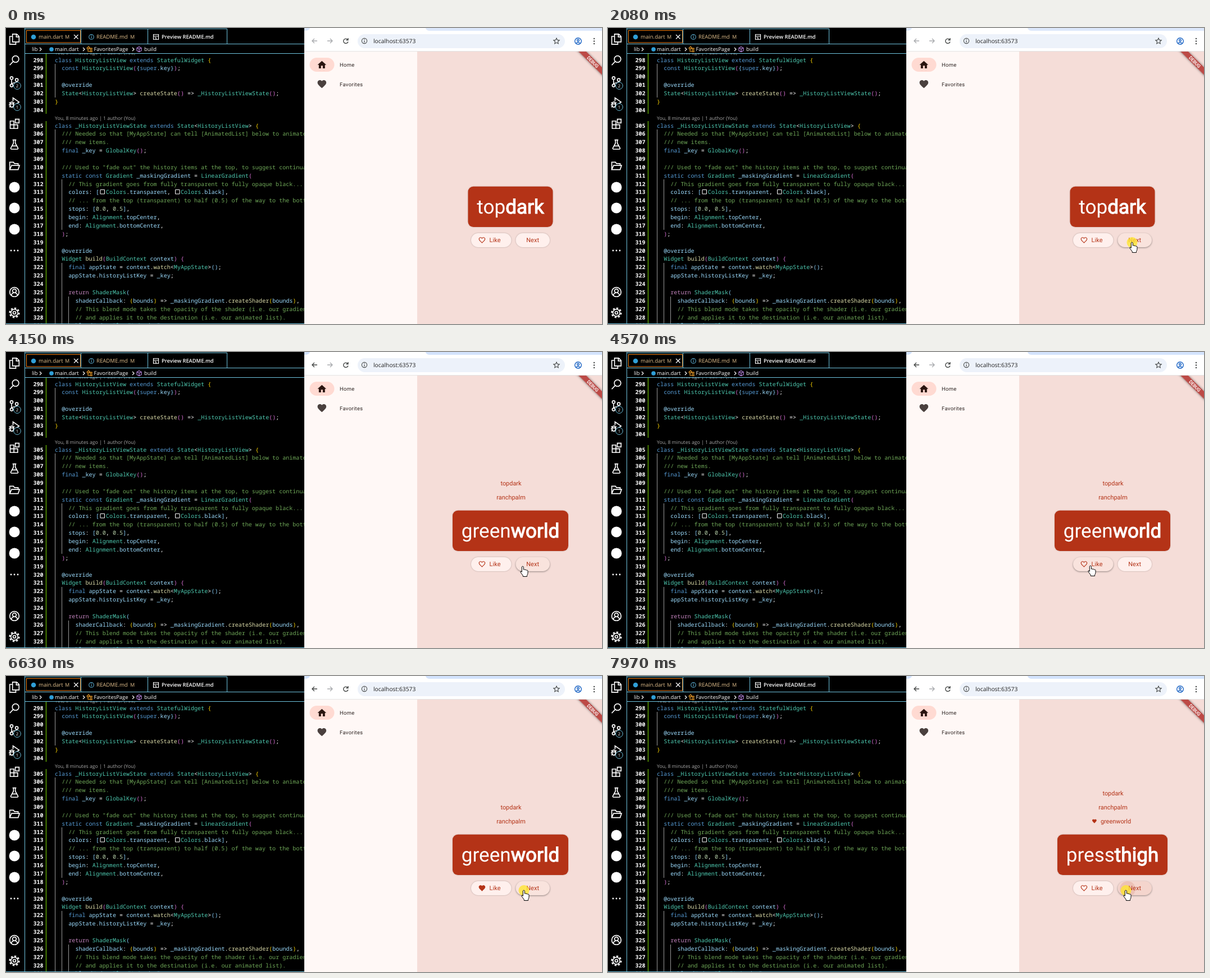
Recreate the animation shown at these times as an HTML page. Size 1061x528 px, loop 8000 ms.

```html
<!DOCTYPE html>
<html lang="en">
<head>
<meta charset="utf-8">
<title>Word pairs</title>
<style>
  html, body { margin: 0; width: 100%; height: 100%; overflow: hidden; background: #000; }
  #stage { display: block; width: 1061px; height: 528px; text-rendering: geometricPrecision; }
  text { white-space: pre; }
  .ui { font-family: "Open Sans", "Noto Sans", sans-serif; }
  .code { font: 500 10.08px "Noto Sans Mono", "DejaVu Sans Mono", monospace; fill: #fff; }
  .app { font-family: Roboto, sans-serif; }
  .label { font-size: 10.92px; fill: #b43317; }
  .line { fill: none; stroke: #fff; stroke-width: 2; }
  .mid { text-anchor: middle; }
  .btn { filter: drop-shadow(0 .8px .8px #0004); }
  .btn.hover { filter: drop-shadow(0 1.5px 1.4px #0006); }
</style>
</head>
<body>
<svg id="stage" viewBox="0 0 1061 528">
  <defs>
    <path id="heart" d="M12 21.35l-1.45-1.32C5.4 15.36 2 12.28 2 8.5 2 5.42 4.42 3 7.5 3c1.74 0 3.41.81 4.5 2.09C13.09 3.81 14.76 3 16.5 3 19.58 3 22 5.42 22 8.5c0 3.78-3.4 6.86-8.55 11.54z"/>
    <path id="hollow" d="M16.5 3c-1.74 0-3.41.81-4.5 2.09C10.91 3.81 9.24 3 7.5 3 4.42 3 2 5.42 2 8.5c0 3.78 3.4 6.86 8.55 11.54L12 21.35l1.45-1.32C18.6 15.36 22 12.28 22 8.5 22 5.42 19.58 3 16.5 3zm-4.4 15.55l-.1.1-.1-.1C7.14 14.24 4 11.39 4 8.5 4 6.5 5.5 5 7.5 5c1.54 0 3.04.99 3.57 2.36h1.87C13.46 5.99 14.96 5 16.5 5c2 0 3.5 1.5 3.5 3.5 0 2.89-3.14 5.74-7.9 10.05z"/>
    <clipPath id="editor"><rect x="34" y="46" width="497" height="482"/></clipPath>
    <clipPath id="page"><rect x="732" y="42" width="329" height="486"/></clipPath>
    <clipPath id="clip-like"><rect x="828" y="366" width="71.5" height="25" rx="12.5"/></clipPath>
    <clipPath id="clip-next"><rect x="907.5" y="366" width="60.5" height="25" rx="12.5"/></clipPath>
  </defs>

  <rect width="1061" height="528"/>

  <!-- activity bar -->
  <g class="line" id="bar"></g>
  <g fill="#fff">
    <circle cx="15" cy="284" r="9.5"/><circle cx="15" cy="321" r="9.5"/><circle cx="15" cy="359" r="9.5"/>
    <circle cx="9" cy="397" r="1.4"/><circle cx="15" cy="397" r="1.4"/><circle cx="21" cy="397" r="1.4"/>
  </g>
  <g class="ui mid" font-size="7.5" fill="#fff">
    <g stroke="#6fc3df" fill="#000"><circle cx="20" cy="103" r="6.3"/><circle cx="20" cy="141" r="6.3"/></g>
    <text x="20" y="105.8">2</text><text x="20" y="143.8">1</text>
  </g>

  <!-- tabs and breadcrumbs -->
  <path d="M33.5 0V528M34 1.5H393.5V28M252.5 2V28M133.5 2V28M34 28.5H531M34 45.5H531" fill="none" stroke="#6fc3df"/>
  <rect x="36.5" y="4.5" width="96" height="21.5" fill="none" stroke="#f38518"/>
  <g fill="#2f9fd8"><circle cx="49" cy="16" r="4.3"/><circle cx="81" cy="38" r="3.8"/></g>
  <g class="ui" font-size="9.6" fill="#e2c08d">
    <text x="58" y="19.3">main.dart</text><text x="105" y="19.3" font-size="9">M</text>
    <text x="161" y="19.3">README.md</text><text x="221" y="19.3" font-size="9">M</text>
    <text x="277" y="19.3" fill="#fff" font-weight="600" font-size="9.3">Preview README.md</text>
  </g>
  <g fill="none" stroke="#fff" stroke-width="1.2">
    <path d="M121 12l7.5 7.5m0-7.5l-7.5 7.5"/>
    <path d="M262.5 11.5h9v9h-9zM262.5 14.5h9M264.5 17h2.5v3.5"/>
    <path d="M60 35l3 3-3 3M137 35l3 3-3 3M225 35l3 3-3 3"/>
    <path d="M152 14.5v4M152 12.3v1.2" stroke="#519aba"/><circle cx="152" cy="16" r="4.3" stroke="#519aba"/>
    <path d="M144 36l3-3 2 2-3 3zM146 38v3.5h3M147.5 37h2M150 36h3v2h-3zM150 40h3v2.5h-3z" stroke="#ee9d28"/>
    <path d="M237 33.5l4 2v5l-4 2-4-2v-5zM233 35.5l4 2 4-2M237 37.5v5" stroke="#b180d7"/>
  </g>
  <g class="ui" font-size="9.4" fill="#fff">
    <text x="46" y="41.3">lib</text><text x="87" y="41.3">main.dart</text>
    <text x="156.5" y="41.3">FavoritesPage</text><text x="246" y="41.3">build</text>
  </g>

  <!-- code -->
  <g clip-path="url(#editor)">
    <path d="M71.5 46V153M71.5 166V528" stroke="#487e02" stroke-width="2"/>
    <path d="M87.5 64V124M87.5 181V528M99.5 270V360M99.5 419V528M111.5 479V528" stroke="#fff" stroke-opacity=".6"/>
    <g class="ui" font-size="8.7" fill="#aaa">
      <text x="87" y="47">You, 8 minutes ago | 1 author (You)</text>
      <text x="87" y="163.5">You, 8 minutes ago | 1 author (You)</text>
    </g>
    <g class="code" id="code"></g>
    <path d="M168 288.5h7.5v7.5h-7.5zM301.5 288.5h7.5v7.5h-7.5z" fill="none" stroke="#fff"/>
  </g>
  <path d="M0 527.5H531" stroke="#6fc3df"/>

  <!-- browser frame -->
  <rect x="531" width="530" height="42" fill="#fff"/>
  <path id="strip" d="M531 0H541Q540 5 531 5zM747 0H1061V5H755Q748 5 747 0z"/>
  <path d="M531 41.5H1061" stroke="#e3e3e3"/>
  <rect x="626" y="11" width="369" height="25" rx="12.5" fill="#edf2fa"/>
  <g fill="none" stroke="#444746" stroke-width="1.4">
    <path id="back" d="M554 23H545M549 19l-4 4 4 4"/>
    <path d="M572 23H581M577 19l4 4-4 4" stroke="#a9abae"/>
    <path d="M608.5 21A4.2 4.2 0 1 0 609 24.5M609 18v3.5h-3.5"/>
    <circle cx="638" cy="23" r="4.6" stroke-width="1.1"/><path d="M638 22.5v3.2M638 20v1.3" stroke-width="1.2"/>
    <path d="M980 18l1.5 3.4 3.7.4-2.8 2.5.8 3.7-3.2-1.9-3.2 1.9.8-3.7-2.8-2.5 3.7-.4z" stroke-width="1.1"/>
    <g stroke="#1a63c4"><circle cx="1018.5" cy="23.5" r="5.8"/><circle cx="1018.5" cy="22" r="1.8"/><path d="M1014.5 27.3q4-3.2 8 0"/></g>
  </g>
  <g fill="#444746"><circle cx="1047" cy="19" r="1.2"/><circle cx="1047" cy="23.5" r="1.2"/><circle cx="1047" cy="28" r="1.2"/></g>
  <text class="ui" x="654" y="27" font-size="10.3" fill="#1f1f1f">localhost:63573</text>

  <!-- navigation rail -->
  <rect x="531" y="42" width="201" height="486" fill="#fff8f6"/>
  <rect x="732" y="42" width="329" height="486" fill="#f5ddd8"/>
  <rect x="540.5" y="53" width="44" height="25" rx="12.5" fill="#ffdad2"/>
  <path transform="translate(553 56.3) scale(.78)" d="M10 20v-6h4v6h5v-8h3L12 3 2 12h3v8z" fill="#2a1510"/>
  <use href="#heart" transform="translate(553 90.7) scale(.78)" fill="#4a403e"/>
  <g class="app" font-size="9.4" letter-spacing=".37" fill="#2a211f">
    <text x="594" y="69">Home</text><text x="594" y="103.5">Favorites</text>
  </g>

  <!-- word card -->
  <g class="app">
    <g id="history"></g>
    <rect id="card" y="282.7" height="72.3" rx="9.4" fill="#b43317" style="filter:drop-shadow(0 .8px .8px #0003)"/>
    <svg id="window" y="283" height="72">
      <text class="mid" id="word" y="48.2" font-size="35.1" fill="#fff"><tspan id="first"></tspan><tspan id="second" stroke="#fff" stroke-width="1.2"></tspan></text>
    </svg>

    <rect class="btn" id="like" x="828" y="366" width="71.5" height="25" rx="12.5"/>
    <rect class="btn" id="next" x="907.5" y="366" width="60.5" height="25" rx="12.5"/>
    <g id="ink" fill="#b43317">
      <rect id="wash" x="820" y="360" width="160" height="40"/>
      <circle id="ripple" opacity=".12"/>
    </g>
    <use id="mark" transform="translate(840.4 371.4) scale(.585)" fill="#b43317"/>
    <g class="label" letter-spacing=".08"><text x="860.6" y="382.2">Like</text><text x="926.2" y="382.2">Next</text></g>

    <g clip-path="url(#page)">
      <g transform="translate(1061 42) rotate(45)">
        <rect x="-46" y="20" width="92" height="9.4" fill="#bd4a46" style="filter:drop-shadow(0 0 2px #0008)"/>
        <text class="mid" x="1.5" y="27.5" font-size="8" fill="#fff" stroke="#fff" stroke-width=".3">DEBUG</text>
      </g>
    </g>
  </g>

  <circle id="glow" r="9.5" fill="#ffe62e" opacity=".78"/>
  <path id="cursor" fill="#fff" stroke="#000" stroke-linejoin="round"/>
</svg>

<script>
const $ = id => document.getElementById(id);
const set = (id, attrs) => { for (const k in attrs) $(id).setAttribute(k, attrs[k]); };
const clamp = x => Math.min(1, Math.max(0, x));
const smooth = x => x * x * (3 - 2 * x);

// Activity bar: centre y and outline on a 24 unit grid
const icons = [
  [20, 'M8 1h9l5 5v12H8zM16 1v6h6M8 6H2v17h13v-5'],
  [58, 'M21.5 9a7 7 0 1 1-14 0 7 7 0 0 1 14 0M9.5 14L2 22'],
  [96, 'M9 4a3 3 0 1 1-6 0 3 3 0 0 1 6 0M20 8a3 3 0 1 1-6 0 3 3 0 0 1 6 0M9 20a3 3 0 1 1-6 0 3 3 0 0 1 6 0M6 7v10M17 11c0 5-11 2-11 6'],
  [133, 'M9 9V2l13 9-9 6M3 15q0-4 3.5-4t3.5 4v3q0 4-3.5 4T3 18zM0 17h3m7 0h3M1 12l2 2m7 0l2-2M1 22l2-2m7 0l2 2M3 15h7'],
  [171, 'M3 6h8v16H3zM3 14h16v8H3M14 2h8v8h-8z'],
  [208, 'M8 2h8M10 2v7L4 20q0 2 2 2h12q2 0 2-2L14 9V2M7 15h10'],
  [246, 'M2 20V4h8l2 3h8v4M2 20l4-9h17l-3 9z'],
  [471, 'M22 12a10 10 0 1 1-20 0 10 10 0 0 1 20 0M16 9.5a4 4 0 1 1-8 0 4 4 0 0 1 8 0M5.5 19q1-5.5 6.5-5.5t6.5 5.5']
];
const outline = (y, body) => `<g transform="translate(5 ${y - 10}) scale(.83)">${body}</g>`;
$('bar').innerHTML = icons.map(([y, d]) => outline(y, `<path d="${d}"/>`)).join('') +
  outline(508, '<circle cx="12" cy="12" r="3"/><circle cx="12" cy="12" r="7.5"/>' +
    '<circle cx="12" cy="12" r="10" stroke-width="3" pathLength="16" stroke-dasharray="1"/>');

const source = `class HistoryListView extends StatefulWidget {
  const HistoryListView({super.key});

  @override
  State<HistoryListView> createState() => _HistoryListViewState();
}

class _HistoryListViewState extends State<HistoryListView> {
  /// Needed so that [MyAppState] can tell [AnimatedList] below to animate
  /// new items.
  final _key = GlobalKey();

  /// Used to "fade out" the history items at the top, to suggest continuation.
  static const Gradient _maskingGradient = LinearGradient(
    // This gradient goes from fully transparent to fully opaque black...
    colors: [  Colors.transparent,   Colors.black],
    // ... from the top (transparent) to half (0.5) of the way to the bottom.
    stops: [0.0, 0.5],
    begin: Alignment.topCenter,
    end: Alignment.bottomCenter,
  );

  @override
  Widget build(BuildContext context) {
    final appState = context.watch<MyAppState>();
    appState.historyListKey = _key;

    return ShaderMask(
      shaderCallback: (bounds) => _maskingGradient.createShader(bounds),
      // This blend mode takes the opacity of the shader (i.e. our gradient)
      // and applies it to the destination (i.e. our animated list).
      blendMode: BlendMode.dstIn,`;

const rules = [
  [/^\/\//, '#6fa858'],
  [/^(class|extends|const|final|static|super)$/, '#569cd6'],
  [/^return$/, '#c586c0'],
  [/^_?[A-Z]/, '#4ec9b0'],
  [/^\d/, '#b5cea8'],
  [/^(createState|build|watch|createShader)$/, '#dcdcaa'],
  [/^[\w@]/, '#9cdcfe']
];
const bracketColors = ['#ffd700', '#da70d6', '#87cefa'];
let depth = 0;
function colorOf(token) {
  if (/^[([{]$/.test(token)) return bracketColors[depth++ % 3];
  if (/^[)\]}]$/.test(token)) return bracketColors[--depth % 3];
  return (rules.find(([pattern]) => pattern.test(token)) || [0, '#fff'])[1];
}
const escapeText = s => s.replace(/&/g, '&amp;').replace(/</g, '&lt;');
$('code').innerHTML = source.split('\n').map((line, i) => {
  const y = i < 7 ? 60.6 + i * 14.85 : 177.5 + (i - 7) * 14.87;
  const spans = line.replace(/\/\/.*|@?\w+(\.\d)?|[^\w/@]/g, token =>
    `<tspan fill="${colorOf(token)}">${escapeText(token)}</tspan>`);
  return `<text x="48.5" y="${y}" font-weight="600">${298 + i}</text><text x="87" y="${y}">${spans}</text>`;
}).join('');

// start, first half, second half, card width, resize time
const words = [
  [0, 'top', 'dark', 151, 1],
  [2720, 'ranch', 'palm', 198, 60],
  [3720, 'green', 'world', 206, 200],
  [7030, 'press', 'thigh', 196, 170]
];
const likedFrom = 5240, likedWord = 2;

// start, end, from x y, to x y, dip
const moves = [
  [660, 870, 1008, 522, 955, 409, 0],
  [1250, 1700, 955, 409, 933, 382, 0],
  [4150, 4570, 920, 382, 859, 381, 2],
  [5700, 6420, 859, 381, 922, 382, 3]
];

// pointer down, ripple start, ripple time, pointer up
const presses = [
  [2080, 2300, 10, 2720],
  [3290, 3480, 40, 3720],
  [4910, 4930, 200, 5220],
  [6630, 6640, 180, 7030],
  [7760, 7775, 195, 8200]
];

const ARROW = 'M0 0V16L3.7 12.6 6.2 18.2 8.6 17.1 6.1 11.7H11Z';
const HAND = 'M-1.7 1.2Q-.2-.9 1.3 1.2V6.2Q2.6 5 4 6.6Q5.4 5.6 6.6 7.3Q8.2 6.4 9 8.3V12.5Q8.8 15 7.5 16.5V18.5H.3V16.8L-3.8 11.2Q-4.8 8.6-2.8 9L-1.7 10.4Z';

$('history').innerHTML = words.slice(0, 3).map(([, a, b], i) =>
  `<svg id="row${i}" x="800" width="200"><g id="item${i}">` +
  (i === likedWord ? '<use href="#heart" transform="translate(61.2 -4.7) scale(.39)" fill="#b43317"/>' : '') +
  `<text class="label mid" x="${i === likedWord ? 104 : 99}" y="3.8">${a + b}</text></g></svg>`).join('');

function drawWords(t) {
  const grown = words.map(([at, , , , time]) => smooth(clamp((t - at) / time)));
  const n = words.findLastIndex(([at]) => t >= at);
  const [, first, second, width] = words[n];
  const before = n ? words[n - 1][3] : width;
  const w = before + (width - before) * grown[n];
  set('card', { x: 898 - w / 2, width: w });
  set('window', { x: 898 - w / 2 + 14, width: w - 28 });
  set('word', { x: w / 2 - 14 });
  $('first').textContent = first;
  $('second').textContent = second;

  let bottom = 271.5;
  for (let i = 2; i >= 0; i--) {
    const h = 25 * grown[i + 1];
    bottom -= h;
    set('row' + i, { y: bottom, height: h });
    set('item' + i, { transform: `translate(0 ${h / 2})` });
  }
  set('mark', { href: n === likedWord && t >= likedFrom ? '#heart' : '#hollow' });
}

function drawPointer(t) {
  const move = moves.findLast(([start]) => t >= start) || moves[0];
  const [start, end, x0, y0, x1, y1, dip] = move;
  const p = smooth(clamp((t - start) / (end - start)));
  const x = x0 + (x1 - x0) * p;
  const y = y0 + (y1 - y0) * p + dip * Math.sin(Math.PI * p);
  const inRow = t >= 660 && y > 366 && y < 391;
  const over = inRow && x > 828 && x < 899.5 ? 'like' : inRow && x > 907.5 && x < 968 ? 'next' : '';
  for (const id of ['like', 'next']) {
    $(id).classList.toggle('hover', id === over);
    set(id, { fill: id === over ? '#f9e3dd' : '#fff0ed' });
  }
  set('cursor', {
    d: over ? HAND : ARROW,
    transform: `translate(${x} ${y})`,
    visibility: t >= 660 ? 'visible' : 'hidden'
  });

  const [down, grow, time, up] = presses.findLast(([at]) => t >= at) || presses[0];
  const spread = clamp((t - grow) / time), fade = clamp((t - up) / 270);
  set('glow', { cx: x, cy: y + .5, visibility: t >= down && t < up ? 'visible' : 'hidden' });
  set('ink', { 'clip-path': `url(#clip-${over || 'next'})`, opacity: 1 - fade });
  set('wash', { opacity: .08 * spread });
  set('ripple', { cx: x + 3, cy: y - 2, r: 14 * spread + 30 * fade });
}

function frame(now) {
  const t = now % 8000;
  const focused = t >= 2150;
  set('strip', { fill: focused ? '#d3e3fd' : '#dde8fb' });
  set('back', { stroke: focused ? '#444746' : '#a9abae' });
  drawWords(t);
  drawPointer(t);
  requestAnimationFrame(frame);
}
requestAnimationFrame(frame);
</script>
</body>
</html>
```
